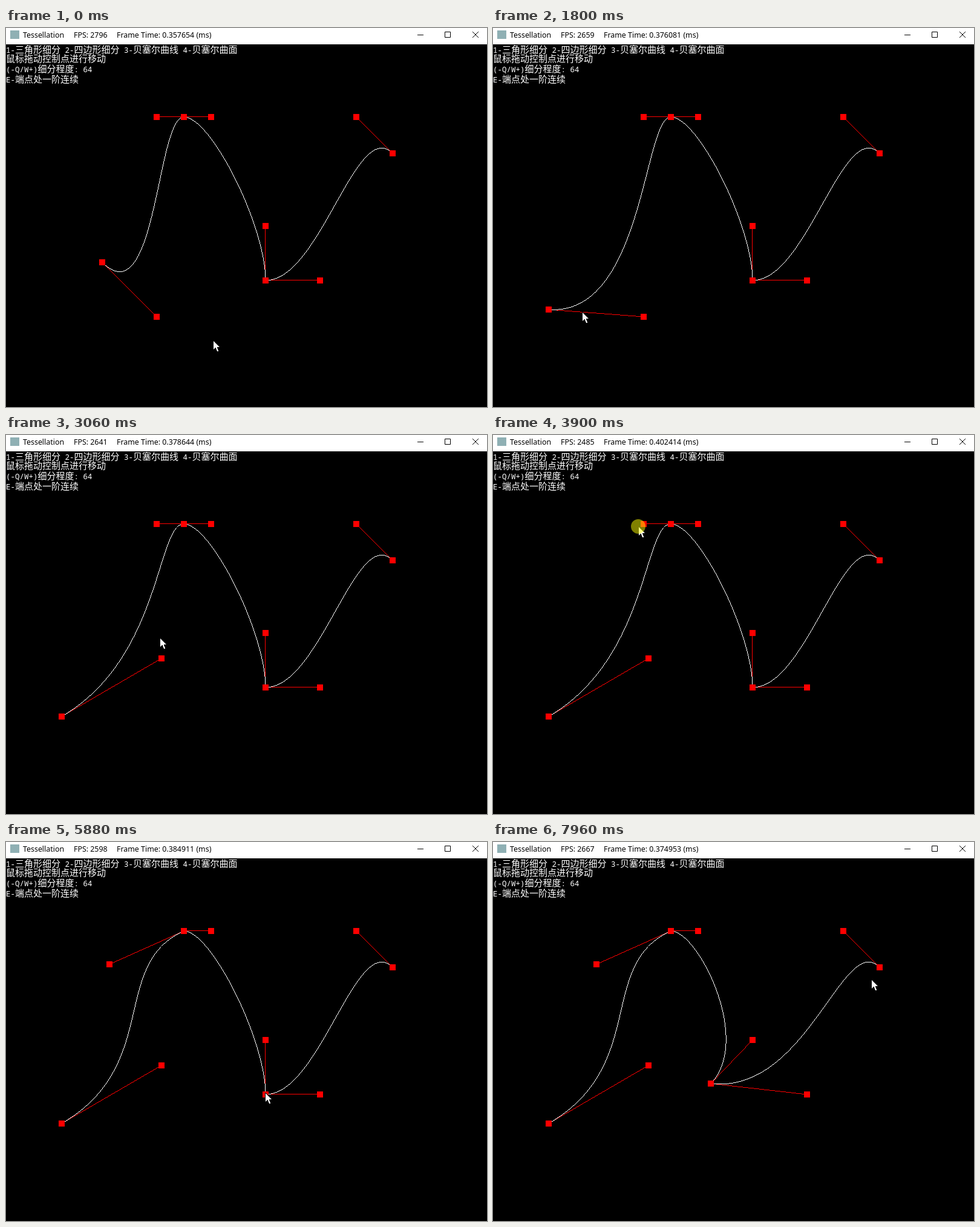
Animation of 795x626 px, one loop 8 s. Source, as an HTML page with a canvas:

```html
<!DOCTYPE html>
<html lang="zh-CN">
<head>
<meta charset="utf-8">
<title>Tessellation</title>
<style>
  html, body { margin: 0; width: 100%; height: 100%; overflow: hidden; background: #000; }
  canvas, svg { position: absolute; left: 0; top: 0; width: 795px; height: 626px; }
  .title { font: 12.4px "Noto Sans", "Open Sans", sans-serif; fill: #000; }
  .help { font: 15px "Noto Sans CJK SC", "Noto Sans CJK", sans-serif; fill: #fff; white-space: pre; }
  .latin { font: 12.5px "Noto Sans Mono", "Liberation Mono", monospace; }
  .buttons { fill: none; stroke: #000; }
</style>
</head>
<body>
<canvas id="stage" width="795" height="626"></canvas>
<svg viewBox="0 0 795 626">
  <rect width="795" height="27" fill="#fff"/>
  <rect x="7" y="4" width="15" height="14" fill="#8fb0b4"/>
  <g class="title">
    <text x="28" y="16">Tessellation</text>
    <text x="112" y="16" id="fps"></text>
    <text x="183" y="16" id="frameTime"></text>
  </g>
  <g class="buttons">
    <path d="M680 11.5H690M725.5 6.5H734.5V15.5H725.5Z"/>
    <path d="M771 6L781 16M781 6L771 16"/>
  </g>
  <g class="help">
    <text y="41">1-三角形细分 2-四边形细分 3-贝塞尔曲线 4-贝塞尔曲面</text>
    <text y="56">鼠标拖动控制点进行移动</text>
    <text y="73">(-Q/W+)细分程度: 64</text>
    <text y="90">E-端点处一阶连续</text>
  </g>
</svg>
<script>
const LOOP = 8000;
const FIRST_REFRESH = 260;
const REFRESH = 140;
const FPS_PERIOD = 980;
const fpsReadings = [2796, 2649, 2659, 2641, 2485, 2563, 2598, 2629, 2667];

const ctx = document.getElementById('stage').getContext('2d');
const fpsLabel = document.getElementById('fps');
const timeLabel = document.getElementById('frameTime');
const arrow = new Path2D('M1 1L11 11H7V12L9 17V18H7L5 13V12H4L1 15Z');

const startPoints = [
  [159, 387], [249, 477], [249, 147], [294, 147], [339, 147],
  [429, 327], [429, 417], [519, 417], [579, 147], [639, 207]
];

// Mouse stops; "drag" is the control point carried to that stop
const stops = [
  { time: 120, at: [342, 516] },
  { time: 820, at: startPoints[0] },
  { time: 1240, at: [121, 421], drag: 0 },
  { time: 1520, at: [92, 465], drag: 0 },
  { time: 2220, at: startPoints[1] },
  { time: 2500, at: [257, 418], drag: 1 },
  { time: 2780, at: [257, 369], drag: 1 },
  { time: 3900, at: [240, 151] },
  { time: 4600, at: [235, 156], drag: 2 },
  { time: 5020, at: [171, 202], drag: 2 },
  { time: 5860, at: [428, 414] },
  { time: 6000, at: startPoints[6] },
  { time: 6700, at: [332, 341], drag: 6 },
  { time: 7400, at: [360, 399], drag: 6 },
  { time: 7960, at: [625, 227] }
];

const mix = (a, b, k) => a + (b - a) * k;
const smooth = k => k * k * (3 - 2 * k);

// Position on the way from one stop to the next
function travel(from, to, time) {
  const k = Math.min(1, (time - from.time) / (to.time - from.time));
  const eased = to.drag === undefined ? smooth(k) : k;
  return [0, 1].map(axis => Math.round(mix(from.at[axis], to.at[axis], eased)));
}

function pose(time) {
  const points = startPoints.slice();
  let mouse = stops[0].at;
  let pressed = false;
  for (let i = 1; i < stops.length && time >= stops[i - 1].time; i++) {
    const { time: end, drag } = stops[i];
    const start = stops[i - 1].time;
    mouse = travel(stops[i - 1], stops[i], time);
    if (drag !== undefined) {
      if (time > start) points[drag] = mouse;
      pressed ||= time <= end;
    }
  }
  return { points, mouse, pressed };
}

// Hard-edged line: one pixel per step of the longer axis, taken at pixel centres
function line(a, b) {
  const major = Math.abs(b[0] - a[0]) >= Math.abs(b[1] - a[1]) ? 0 : 1;
  const minor = 1 - major;
  if (a[major] > b[major]) [a, b] = [b, a];
  for (let p = Math.ceil(a[major] - 0.5); p + 0.5 < b[major]; p++) {
    const k = (p + 0.5 - a[major]) / (b[major] - a[major]);
    const q = Math.ceil(mix(a[minor], b[minor], k)) - 1;
    ctx.fillRect(major ? q : p, major ? p : q, 1, 1);
  }
}

function bezier(a, b, c, d, segments = 64) {
  const at = t => [0, 1].map(axis => {
    const u = 1 - t;
    return u * u * u * a[axis] + 3 * u * u * t * b[axis] + 3 * u * t * t * c[axis] + t * t * t * d[axis];
  });
  for (let i = 0; i < segments; i++) line(at(i / segments), at((i + 1) / segments));
}

function drawMouse([x, y], pressed) {
  ctx.save();
  ctx.translate(x, y);
  ctx.lineWidth = 2;
  ctx.lineJoin = 'round';
  ctx.strokeStyle = '#000';
  ctx.stroke(arrow);
  ctx.fillStyle = '#fff';
  ctx.fill(arrow);
  if (pressed) {
    ctx.fillStyle = 'rgba(255, 255, 0, 0.5)';
    ctx.beginPath();
    ctx.arc(0, 0, 12, 0, 2 * Math.PI);
    ctx.fill();
  }
  ctx.restore();
}

function draw(time) {
  const { points, mouse, pressed } = pose(time);

  ctx.fillStyle = '#000';
  ctx.fillRect(0, 0, 795, 626);

  // Handles join each end point to its neighbours
  ctx.fillStyle = '#f00';
  for (let i = 0; i < 9; i++) if (i % 3 !== 1) line(points[i], points[i + 1]);
  ctx.fillStyle = '#fff';
  for (let i = 0; i < 9; i += 3) bezier(...points.slice(i, i + 4));
  ctx.fillStyle = '#f00';
  for (const [x, y] of points) ctx.fillRect(x - 5, y - 5, 10, 10);

  drawMouse(mouse, pressed);

  const fps = fpsReadings[Math.floor((time + 160) / FPS_PERIOD)];
  fpsLabel.textContent = `FPS: ${fps}`;
  timeLabel.textContent = `Frame Time: ${(1000 / fps).toFixed(6)} (ms)`;
}

// Half-width characters get their own font
for (const text of document.querySelectorAll('.help text')) {
  text.innerHTML = text.textContent.replace(/[\x20-\x7e]+/g, '<tspan class="latin">$&</tspan>');
}

let shown = -1;
function tick() {
  const now = performance.now() % LOOP;
  const time = now < FIRST_REFRESH ? 0 : FIRST_REFRESH + Math.floor((now - FIRST_REFRESH) / REFRESH) * REFRESH;
  if (time !== shown) draw(shown = time);
  requestAnimationFrame(tick);
}
tick();
</script>
</body>
</html>
```
